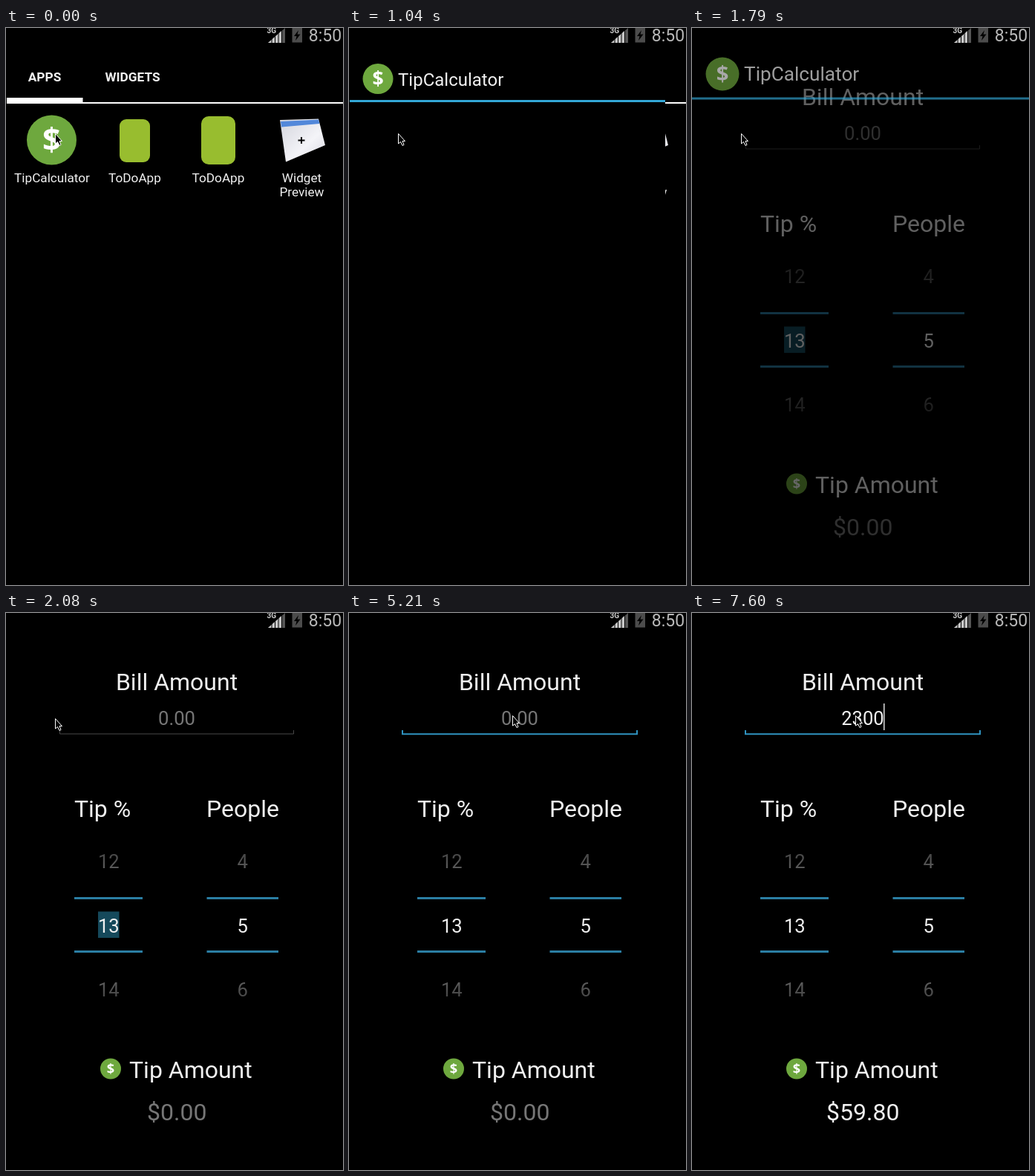
An HTML page that plays this animation: 454x751 px, repeating every 8 s.

```html
<!DOCTYPE html>
<html lang="en">
<head>
<meta charset="utf-8">
<title>Tip calculator demo</title>
<style>
  html, body { margin: 0; width: 100%; height: 100%; overflow: hidden; background: #000; }
  svg { display: block; width: 100vw; height: 100vh; }
  text { font-family: Roboto, sans-serif; fill: #f0f0f0; }
  .mid { text-anchor: middle; }
  .head { font-size: 32px; }
  .num { font-size: 25.6px; text-anchor: middle; }
  .label { font-size: 17.2px; text-anchor: middle; }
  .tab { font-size: 17.3px; font-weight: 700; text-anchor: middle; }
  .coin { font: 700 1.3px "Open Sans", sans-serif; text-anchor: middle; fill: #fff; }
  .rule { stroke: #2b7ea3; stroke-width: 3; }
  .faint text { fill: url(#fade); }
</style>
</head>
<body>
<svg viewBox="0 0 454 751">
  <defs>
    <linearGradient id="fade" gradientUnits="userSpaceOnUse" x1="0" y1="310" x2="0" y2="532">
      <stop offset="0" stop-color="#383838"/>
      <stop offset=".25" stop-color="#707070"/>
      <stop offset=".75" stop-color="#707070"/>
      <stop offset="1" stop-color="#383838"/>
    </linearGradient>
    <linearGradient id="paper" x1="0" y1="0" x2="1" y2="1">
      <stop offset="0" stop-color="#d2d4dc"/>
      <stop offset=".6" stop-color="#f4f4f8"/>
      <stop offset="1" stop-color="#d8d8e0"/>
    </linearGradient>
    <g id="coin">
      <circle r="1" fill="#6ea83e"/>
      <text class="coin" y=".46">$</text>
    </g>
  </defs>
  <rect width="454" height="751"/>

  <g id="launcher">
    <text class="tab" x="52" y="71.5">APPS</text>
    <text class="tab" x="170.5" y="71.5">WIDGETS</text>
    <path d="M1 94H103.5V100H454V102H1Z" fill="#fff"/>
    <g id="app">
      <use href="#coin" transform="translate(61.5 151) scale(33.5)"/>
      <text class="label" x="62" y="208">TipCalculator</text>
    </g>
    <rect x="153" y="123" width="41" height="58" rx="9" fill="#98bd2f"/>
    <text class="label" x="173.5" y="208">ToDoApp</text>
    <rect x="263" y="119" width="46" height="65" rx="10" fill="#98bd2f"/>
    <text class="label" x="286" y="208">ToDoApp</text>
    <path d="M369 124L421 122.5L430 158L377 180.5Z" fill="url(#paper)"/>
    <path d="M370 126L421 123.5L422.5 129L371 133.5Z" fill="#5288da"/>
    <path d="M398 147V156M393.5 151.5H402.5" stroke="#000" stroke-width="2"/>
    <text class="label" x="398.5" y="208">Widget</text>
    <text class="label" x="398.5" y="227">Preview</text>
  </g>
  <rect id="cover" y="25" width="426" height="726"/>

  <g id="form">
    <text class="head mid" x="230" y="104">Bill Amount</text>
    <text class="num" id="bill" x="230" y="150.5"></text>
    <path id="field" fill="none"/>
    <path id="caret" stroke="#ddd" stroke-width="1.5"/>

    <text class="head mid" x="130" y="275">Tip %</text>
    <text class="head mid" x="319" y="275">People</text>
    <g class="faint">
      <text class="num" x="138.3" y="344">12</text>
      <text class="num" x="138.3" y="516.5">14</text>
      <text class="num" x="318.8" y="344">4</text>
      <text class="num" x="318.8" y="516.5">6</text>
    </g>
    <rect id="mark" x="124" y="402.5" width="28.5" height="35.5" fill="#15495b"/>
    <text class="num" x="138.3" y="430.5">13</text>
    <text class="num" x="318.8" y="430.5">5</text>
    <path class="rule" d="M92 384.5H184M92 456.5H184M270.5 384.5H367M270.5 456.5H367"/>

    <use href="#coin" transform="translate(141 614.5) scale(14)"/>
    <text class="head" x="166" y="627">Tip Amount</text>
    <text class="head mid" id="tip" x="230.3" y="683.5"></text>
  </g>

  <g id="bar">
    <use id="barIcon" href="#coin"/>
    <text id="barTitle">TipCalculator</text>
    <path id="barLine" stroke="#33a7d6" stroke-width="3"/>
  </g>

  <g id="status">
    <path d="M353 20L376 0V20Z" fill="#555"/>
    <path d="M353 20L371 4V20Z" fill="#c8c8c8"/>
    <path d="M358 20V8M362.5 20V8M367 20V4M371.5 20V0" stroke="#000"/>
    <text x="351.5" y="7" font-size="10" font-weight="700" style="fill:#ccc">3G</text>
    <rect x="385.5" y="0" width="13.5" height="19.5" fill="#4c4c4c"/>
    <path d="M394 3L388 11H391.5L390 17L396.5 8.5H392.5Z"/>
    <text x="430" y="18" font-size="23" class="mid" style="fill:#b8b8b8">8:50</text>
  </g>
  <path id="pointer" d="M.5 .5V14L3.5 11.5L6 16.5L8 15.5L6 10.5H9.5Z" stroke="#fff" stroke-linejoin="round"/>
</svg>
<script>
const LOOP = 8000;
const $ = id => document.getElementById(id);
const set = (id, attrs) => {
  for (const k in attrs) $(id).setAttribute(k, attrs[k]);
};
const show = (id, on) => set(id, { visibility: on ? "visible" : "hidden" });

// Last value whose start time has passed
const at = (t, steps) => steps.filter(s => s[0] <= t).pop()[1];

const pointer = [[0, [66, 142]], [2830, [154, 152]], [2980, [192, 148]],
  [3120, [216, 139]], [3270, [220, 138]]];
const typed = [[0, ""], [6560, "2"], [6860, "23"], [7300, "230"], [7600, "2300"]];
const formAlpha = [[0, 0], [1790, .4], [1940, .8], [2080, 1]];
const barAlpha = [[0, 0], [1040, 1], [1790, .66], [1940, 0]];
const caretOn = [[0, 0], [3720, 1], [4170, 0], [4620, 1], [5210, 0], [5660, 1], [6110, 0], [6560, 1]];

function drawBar(t) {
  const full = t >= 1190;
  const [x, y, r, tx, ty, size, right, line] = full
    ? [41, 62, 22.5, 70, 71, 26.2, 454, 95]
    : [39, 68.5, 20.5, 66, 77.5, 24, 426, 98.5];
  set("barIcon", { transform: `translate(${x} ${y}) scale(${r})` });
  set("barTitle", { x: tx, y: ty, "font-size": size });
  set("barLine", { d: `M${full ? 0 : 1} ${line}H${right}` });
  set("bar", { opacity: at(t, barAlpha) });
}

function drawForm(t) {
  const bill = at(t, typed), focused = t >= 3720;
  const style = bill ? "" : "fill:#767676";
  $("bill").textContent = bill || "0.00";
  $("tip").textContent = "$" + (bill * .13 / 5).toFixed(2);
  set("bill", { style });
  set("tip", { style });
  set("field", focused
    ? { d: "M72 158V163.3H388V158", stroke: "#2f93c0", "stroke-width": 2 }
    : { d: "M72.5 158V163H387.5V158", stroke: "#484848", "stroke-width": 1 });
  const x = bill ? 230 + bill.length * 7.19 : 205;
  set("caret", { d: `M${x} 122V158`, opacity: at(t, caretOn) });
  set("mark", { opacity: focused ? 0 : 1 });
  set("form", { opacity: at(t, formAlpha) });
}

function draw(t) {
  show("launcher", t < 1190);
  show("cover", t >= 1040 && t < 1190);
  set("app", { opacity: t < 140 ? 1 : .4 });
  drawBar(t);
  drawForm(t);
  set("pointer", { transform: `translate(${at(t, pointer)})` });
}

const start = performance.now();
function tick() {
  draw((performance.now() - start) % LOOP);
  requestAnimationFrame(tick);
}
tick();
</script>
</body>
</html>
```
